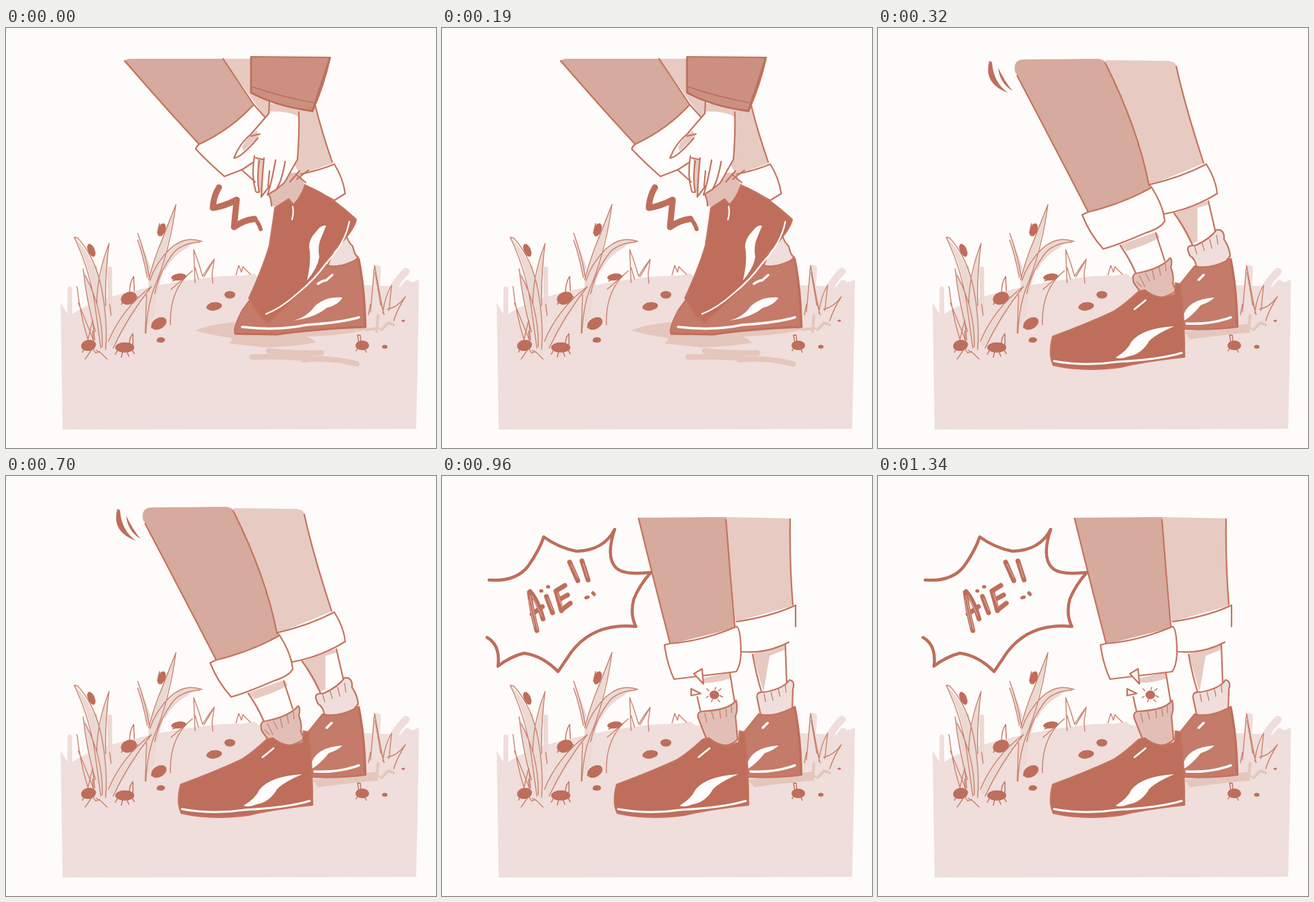
These frames come from a looping animation (630 by 614 pixels, 1.6 s). An HTML page:

```html
<!DOCTYPE html>
<html lang="fr">
<head>
<meta charset="utf-8">
<title>Aïe !!</title>
<style>
  html, body { margin: 0; width: 100%; height: 100%; overflow: hidden; background: #fefcfa; }
  svg { display: block; width: 100vw; height: 100vh; }
  path { fill: none; stroke-linecap: round; stroke-linejoin: round; }
  .line { stroke: #c4735f; stroke-width: 2.2; }
  .thin { stroke: #c98270; stroke-width: 1.4; }
  .white { fill: #fffdfc; }
  .pale { fill: #efdedb; }
  .light { fill: #e7cac1; }
  .mid { fill: #d6aa9c; }
  .sleeve { fill: #cb9080; }
  .sock { fill: #e1bfb6; }
  .dark { fill: #be6e5b; }
  .back { fill: #c47b69; }
  .shine { stroke: #fffdfc; stroke-width: 3.5; }
  .blush { stroke: #efdedb; stroke-width: 11; }
  .leaf { fill: #ecd9d4; }
  .shadow { fill: #e4c6bd; }
  .shade { stroke: #e4c6bd; stroke-width: 8; }
  .ink { stroke: #be6e5b; }

  /* hard cuts: 320, 640 and 640 ms */
  #grab, #step, #ouch, #shoes { animation: 1600ms step-end infinite; }
  #grab { animation-name: first; }
  #step { animation-name: second; }
  #ouch { animation-name: third; }
  #shoes { animation-name: standing; }
  @keyframes first { 0% { visibility: visible } 20%, 100% { visibility: hidden } }
  @keyframes second { 0% { visibility: hidden } 20% { visibility: visible } 60%, 100% { visibility: hidden } }
  @keyframes third { 0% { visibility: hidden } 60%, 100% { visibility: visible } }
  @keyframes standing { 0% { visibility: hidden } 20%, 100% { visibility: visible } }
</style>
</head>
<body>
<svg viewBox="0 0 630 614" preserveAspectRatio="none">
  <!-- ground -->
  <path class="pale" d="M80 402L90 418V380Q93 375 97 380V418Q125 400 160 391Q215 376 270 368Q320 361 347 362L364 359L370 364L440 372L530 376L578 378L605 368L604 440L601 586L83 587Z"/>
  <path class="blush" d="M541 400L544 352M556 405Q568 373 586 356M566 400L588 374"/>
  <path class="shade" style="stroke-width:4" d="M528 441L546 439M545 420L543 444M550 441L560 431L568 434"/>

  <!-- grass -->
  <g id="grass">
    <path class="leaf" d="M249 258Q222 322 209 368L206 440L214 425L220 370Q239 318 249 258ZM100 306Q123 345 130 403L139 468L147 468Q148 420 141 385Q131 336 100 306ZM151 315Q135 360 135 400L146 440Q145 370 151 315ZM213 378Q168 414 150 458L157 468Q182 424 213 378ZM193 302Q203 345 208 365L212 350ZM287 312Q262 302 238 325Q218 345 213 372Q250 318 287 312ZM113 352Q119 405 132 444L140 460Q138 400 113 352Z"/>
    <path stroke="#ecd9d4" stroke-width="7" d="M265 318Q242 330 232 350M152 352V410M232 322Q218 350 212 385M130 350Q135 385 133 420M228 352Q216 385 214 420"/>
    <path class="thin" d="M249 258L230 306Q216 340 209 368M249 258Q241 318 222 368Q207 400 205 446M193 300Q206 335 210 366M193 310Q202 337 207 365M287 312Q262 303 240 323Q219 344 211 369M284 313Q260 314 247 327Q225 354 218 388
      M100 306L105 307Q132 336 141 386Q149 430 146 470M100 306Q122 352 130 403L139 468M151 315Q133 361 133 404M151 315Q145 360 146 406M113 352Q118 400 131 444M116 362Q142 410 141 466M104 378Q109 421 120 455M106 402L128 456
      M213 378Q170 410 150 458M213 378Q178 422 157 468M273 355Q239 382 241 434M273 355L242 382M206 390L204 446M152 404L154 420M120 456L127 427L130 456"/>
    <path class="thin" d="M277 372L275 324Q283 344 288 363Q296 350 305 338L302 360L303 373M277 350L282 367M290 364L303 342M337 361L341 347L345 357L347 349L358 360M116 484L127 468L131 475L137 473L148 484M132 471L139 475"/>
    <path class="thin" d="M534 415L540 347Q546 381 552 411M541 358L549 405M534 404L531 419M552 417Q555 392 565 376L561 413M559 411Q573 409 585 393Q574 410 568 428M554 419L549 401"/>
  </g>

  <!-- bugs -->
  <g id="bugs" fill="#be6e5b">
    <ellipse cx="228" cy="295" rx="5.5" ry="10" transform="rotate(20 228 295)"/>
    <ellipse cx="125" cy="325" rx="5" ry="10" transform="rotate(-24 125 325)"/>
    <ellipse cx="253" cy="364" rx="11" ry="5" transform="rotate(-8 253 364)"/>
    <ellipse cx="180" cy="395" rx="12" ry="9" transform="rotate(-20 180 395)"/>
    <ellipse cx="224" cy="432" rx="12" ry="8" transform="rotate(-30 224 432)"/>
    <ellipse cx="227" cy="456" rx="6" ry="4"/>
    <ellipse cx="121" cy="464" rx="11" ry="8" transform="rotate(-10 121 464)"/>
    <ellipse cx="174" cy="467" rx="14" ry="7.5"/>
    <ellipse cx="305" cy="407" rx="11.5" ry="6" transform="rotate(-8 305 407)"/>
    <ellipse cx="328" cy="390" rx="8" ry="5.5"/>
    <ellipse cx="522" cy="464" rx="10" ry="7"/>
    <ellipse cx="555" cy="466" rx="4" ry="2.8"/>
    <ellipse cx="582" cy="428" rx="2.5" ry="1.6"/>
    <path class="thin ink" d="M181 386Q181 373 187 363L188 384M128 458L127 443M181 461Q181 452 186 447L186 463M163 472L160 477M171 473L169 481M177 473L180 480M184 470L188 476M517 460L515 449L519 449L520 459M515 468L513 472M526 470L528 474M222 300L225 286M213 438L215 431M301 402L307 404M173 399L169 404M189 391L193 394M244 370L263 363M114 470L112 474M223 459L221 457"/>
  </g>

  <!-- hand pulling the shoe -->
  <g id="grab">
    <path class="shadow" d="M277 442Q300 433 335 430L527 437L528 441Q490 450 440 451Q450 455 454 460Q420 466 380 467L326 461Q333 456 330 453Q300 449 277 442Z"/>
    <path class="shade" d="M361 481Q410 479 448 484M385 472Q430 476 462 475M436 485Q475 481 514 491"/>
    <path class="mid" d="M172 48L180 45L318 45L363 112L328 147L283 171Z"/>
    <path class="light" d="M318 45H360V92L452 112L478 198L431 214L380 131Z"/>
    <path class="line" d="M174 48Q230 113 283 170M318 45L363 112M453 113Q462 150 478 196"/>
    <path class="white line" d="M283 170Q330 148 363 112L380 131L372 190L346 207L320 217Q294 194 278 177Q279 173 283 170Z"/>
    <path class="white line" d="M430 214Q460 208 481 199Q494 220 497 242L481 252L435 228Z"/>
    <path class="pale line" d="M490 302L498 302Q502 314 508 319Q511 333 516 335L506 345L470 350Z"/>
    <path class="back line" d="M470 346Q483 354 517 337Q526 380 527 437Q450 440 397 448L336 447Q331 442 346 413L360 394Z"/>
    <path class="ink" stroke-width="3" d="M517 339Q525 380 526 436M527 437Q450 440 397 448L336 447"/>
    <path class="shine" d="M457 374Q464 369 469 369L478 361M346 437Q398 443 440 434Q490 431 517 423"/>
    <path class="white" d="M420 428Q441 423 452 407Q468 392 493 394Q487 405 470 409Q454 423 420 428Z"/>
    <path class="sock" d="M383 242Q389 251 389 260Q399 264 414 253L421 256L439 234L430 211L413 212Z"/>
    <path class="line" d="M385 243Q389 251 389 260M425 214L439 226"/>
    <path class="dark line" d="M394 263L414 250L421 258Q433 246 438 230Q475 244 513 280Q510 296 480 326Q442 381 384 431L372 421L356 395Q377 349 386 318Q391 286 394 263Z"/>
    <path class="shine" style="stroke-width:2.2" d="M420 261Q422 270 419 280M381 418Q402 410 426 389Q452 368 469 344Q497 315 503 283"/>
    <path class="white" d="M469 289Q462 287 455 297Q444 308 444 320Q448 339 441 369Q456 352 459 335Q456 318 462 306Z"/>
    <path class="white" d="M387 105L385 125L359 156Q339 174 334 190Q339 193 366 167L364 192Q359 220 366 240L372 238L375 247L385 233L383 244L396 236L408 226L427 191L430 120Z"/>
    <path class="light" d="M385 110L450 116L453 126L429 130Q415 121 386 122ZM346 174Q352 160 367 150L371 158L348 180ZM368 191L377 191L376 244L371 238Z"/>
    <path class="line" d="M386 108L385 125L360 154Q342 169 334 190Q344 190 369 161M359 158L372 155M364 187Q359 216 366 239M371 194Q367 220 371 240L367 240M378 190Q375 222 374 247L386 231M386 209L384 231M395 193Q389 227 383 244L396 236M409 195Q404 224 396 236L408 226L427 192Q430 155 429 123M345 207L365 225M430 209L416 225M443 208L426 221M366 190L376 192"/>
    <path class="sleeve line" d="M359 42L475 43Q466 84 449 122Q397 114 359 95Z"/>
    <path class="thin ink" d="M361 86Q405 101 450 109"/>
    <path class="ink" stroke-width="2.6" d="M359 43V94Q395 115 449 121L474 45"/>
    <path class="ink" stroke-width="9" d="M312 233Q304 246 303 263Q322 260 338 251L334 291Q348 281 364 279"/>
    <path class="ink" stroke-width="6" d="M364 279Q370 284 373 294"/>
  </g>

  <!-- stepping down -->
  <g id="step">
    <path class="light" d="M333 47L423 48Q437 49 437 56Q450 115 477 198L398 230Z"/>
    <path class="line" d="M437 56Q450 115 477 197"/>
    <path class="white" d="M434 271L484 253L494 298L462 319Z"/>
    <path class="light" d="M434 271L482 253L484 258L468 263L468 312L459 316Z"/>
    <path class="line" d="M434 271Q451 294 461 318M484 253L494 296"/>
    <path class="white line" d="M398 229Q445 218 481 199Q495 221 497 242Q462 264 419 272Z"/>
    <path class="pale line" d="M454 325Q452 317 465 318Q487 308 496 295Q508 294 507 309Q515 321 516 333L505 347L467 351Q465 337 457 333Z"/>
    <path class="thin" d="M464 320L467 330M475 315L478 325M486 309L489 322M496 303L498 316"/>
    <path class="mid" d="M201 65Q197 46 214 46L323 45Q334 47 333 51Q381 147 397 230L401 236L308 271Q262 180 202 66Z"/>
    <path class="line" d="M204 70Q262 180 308 269M333 51Q381 147 397 230"/>
    <path class="white" d="M355 318L408 299L426 342L375 366Z"/>
    <path class="light" d="M355 317L408 298L413 306Q394 317 364 326Z"/>
    <path class="line" d="M355 318Q369 338 377 357M407 300L420 340"/>
    <path class="white line" d="M299 273L308 269Q358 257 401 233Q418 260 420 282Q416 292 391 300Q352 317 330 323Q310 301 299 273Z"/>
    <path class="sock line" d="M375 373Q370 358 382 358Q416 351 428 336Q432 340 429 350Q434 362 432 374L437 384Q416 400 391 392L383 384Z"/>
    <path class="thin" d="M383 362L391 378M392 359L398 370M402 354L405 368M412 350L414 361M421 344L422 355M379 371L386 378"/>
    <path class="dark" d="M163 48Q154 82 191 95Q169 80 167 50ZM176 58Q178 80 197 92Q185 77 176 58Z"/>
  </g>

  <!-- the sting -->
  <g id="ouch">
    <path class="light" d="M415 60L511 62Q509 125 514 190L430 213Z"/>
    <path class="line" d="M510 63Q509 125 514 188"/>
    <path class="white" d="M455 259L504 246L506 305L470 318Z"/>
    <path class="light" d="M455 260L502 247V254L480 263L471 316Z"/>
    <path class="line" d="M455 261Q461 293 468 315M503 246L505 303"/>
    <path class="white" d="M431 213Q484 205 518 189L519 220Q516 239 508 243Q475 260 438 258Z"/>
    <path class="line" d="M432 213Q484 205 518 189L518 220M508 243Q475 260 440 257"/>
    <path class="pale line" d="M462 326Q459 315 472 316Q501 311 509 298Q518 300 514 312L513 347L496 349L467 350Z"/>
    <path class="thin" d="M472 319L474 330M482 316L485 328M493 312L495 322M503 306L504 316"/>
    <path class="mid" d="M288 61L416 60Q422 142 430 222L334 246Q309 148 288 61Z"/>
    <path class="line" d="M288 62Q309 148 334 244M416 64Q422 142 429 220"/>
    <path class="white" d="M370 297L422 288L429 332L380 346Z"/>
    <path class="light" d="M376 297L422 287V296Q405 302 380 303Z"/>
    <path class="line" d="M422 289L429 332M374 323L379 345"/>
    <path class="white line" d="M326 247L334 245Q383 241 432 220Q438 225 438 260Q437 278 431 286Q382 292 340 297Q330 276 326 247Z"/>
    <path class="sock line" d="M377 358Q371 345 382 344Q421 342 431 328Q434 341 430 351L433 385Q420 400 390 391Z"/>
    <path class="thin" d="M385 347L388 360M395 345L398 355M407 343L408 354M416 340L417 351M424 335L424 346"/>
    <path class="white line" d="M369 289L381 282L383 304ZM365 311L379 318L365 321Z"/>
    <ellipse class="dark" cx="399" cy="320" rx="7" ry="6.5"/>
    <path class="thin ink" d="M391 314L388 311M400 312L401 309M405 314L409 311M407 321L411 323M404 327L407 330M396 327L395 330M390 322L387 324"/>
    <path class="ink" stroke-width="4.5" d="M69 152Q108 155 126 132Q143 108 149 89Q171 105 197 110Q237 109 253 78Q239 120 256 135Q267 145 306 141Q289 160 281 180Q275 202 284 220Q222 214 189 258L170 286Q148 263 120 259Q100 264 82 278Q86 247 66 236"/>
    <g role="img" aria-label="AÏE !!" class="ink">
      <path stroke-width="7" d="M128 170Q131 196 139 226M129 169Q140 181 148 209M132 202L147 191M153 176L162 200M167 168Q171 182 175 197M167 168L180 160M171 181L184 174M175 196L188 186"/>
      <path stroke-width="7" d="M187 126L199 153M205 124L214 152"/>
      <path stroke-width="5" d="M145 168L146 168M155 162L156 162M211 178L214 177M221 171L223 173"/>
      <path style="stroke:#efdcd6" stroke-width=".7" d="M129 175L140 225M127 181L136 221M132 175L146 204M155 179L162 196M169 171L176 192M189 129L199 149M207 128L213 148"/>
    </g>
  </g>

  <!-- both shoes on the ground -->
  <g id="shoes">
    <path class="shadow" d="M449 444L545 432L544 445Q500 449 457 455Z"/>
    <path class="back line" d="M436 374L443 374L464 348Q487 354 517 337Q526 380 527 437Q490 442 447 440Z"/>
    <path class="ink" stroke-width="3" d="M517 339Q525 380 526 436"/>
    <path class="shine" d="M470 368L477 361M452 432Q487 434 517 423"/>
    <path class="white" d="M446 424Q453 396 493 394Q486 401 473 405Q461 420 450 427Q445 428 446 424Z"/>
    <path class="dark line" d="M256 451Q310 431 346 414Q364 402 382 385L391 383Q413 401 435 389L436 373L443 375Q449 420 449 481Q391 487 355 496Q300 503 257 493Q249 477 256 451Z"/>
    <path class="shine" style="stroke-width:3" d="M258 487Q304 495 350 488Q411 485 445 475"/>
    <path class="shine" style="stroke-width:2.8" d="M376 411L392 398"/>
    <path class="white" d="M348 482Q366 471 371 459Q386 439 434 436Q406 448 397 458Q386 477 367 480Q356 485 348 482Z"/>
  </g>
</svg>
</body>
</html>
```
